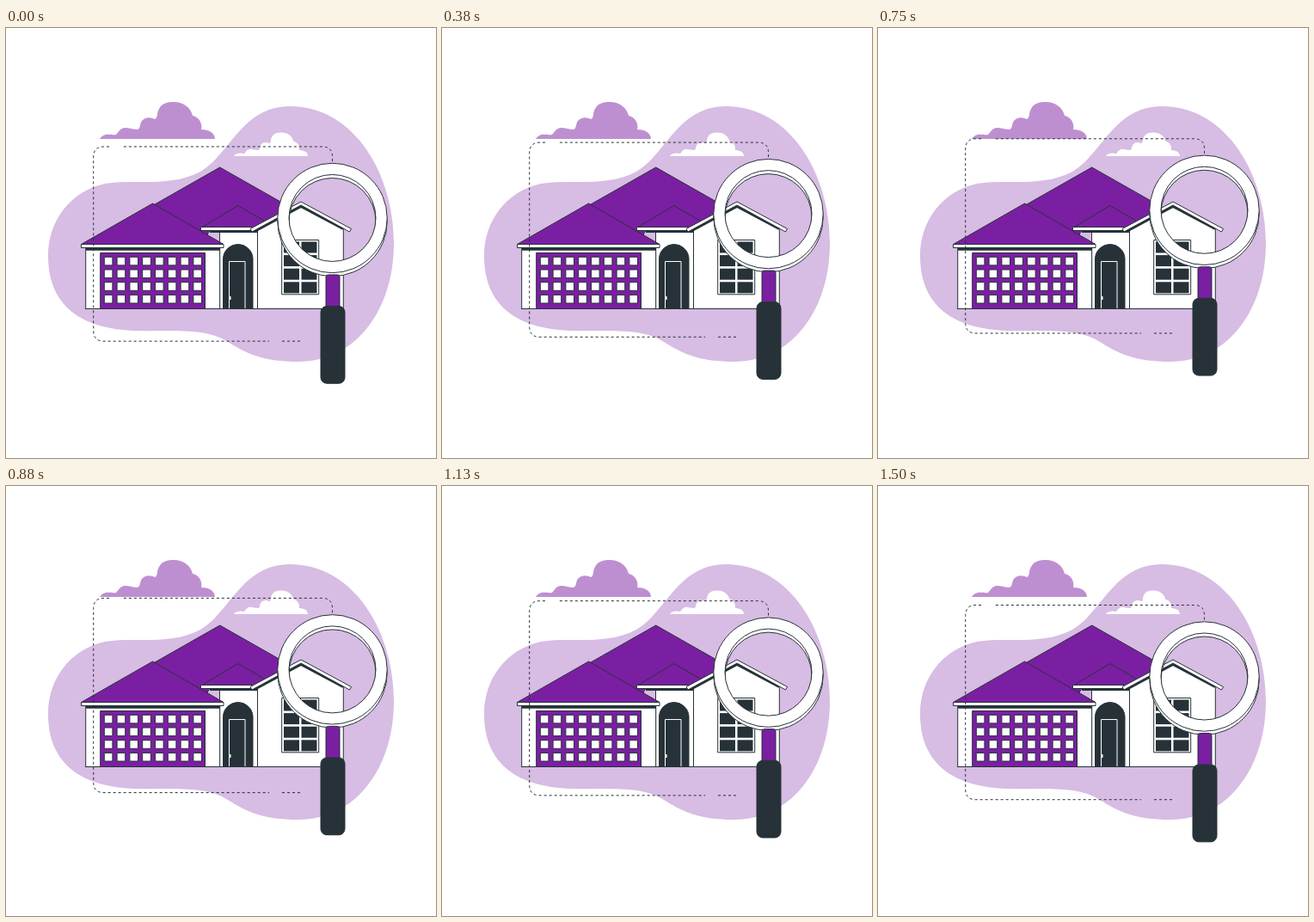
An HTML page with a canvas for the animation above (1.54 s loop, 500 by 500 pixels).

```html
<!DOCTYPE html>
<html lang="en">
<head>
<meta charset="utf-8">
<title>House search</title>
<style>
html, body { margin: 0; width: 100%; height: 100%; overflow: hidden; background: #fff; }
canvas { display: block; width: 100vmin; height: 100vmin; }
</style>
</head>
<body>
<canvas id="stage" width="500" height="500"></canvas>
<script>
const ctx = document.getElementById('stage').getContext('2d');
const INK = '#263238', PURPLE = '#7b1fa2', PALE = '#d7bce3', MID = '#bd8fd0', WHITE = '#fff';
const LOOP = 1540, STEPS = 37, RISE = 10, REST = 0.5;

const blob = new Path2D(`M49 265C49 225 74 190 115 181C150 175 190 186 226 167
  C260 148 274 91 330 91C405 91 451 170 451 250C451 330 405 388 340 388
  C300 388 280 379 258 365C232 348 190 353 150 352C90 350 49 325 49 265Z`);

// Origin at the lower left corner of the cloud
const cloud = new Path2D(`M0 0C2-3 6-6 11-5C13-6 16-4 19-5C22-8 23-12 29-13C34-13 39-11 44-11
  C48-12 46-19 50-22C54-26 60-25 64-23C68-24 66-31 69-35C72-42 80-43 86-43
  C98-43 106-36 108-27C115-26 120-18 118-11C125-11 134-8 134 0Z`);

const dashes = new Path2D(`M379.5 155V150Q379.5 138 367.5 138H134
  M120 138H114Q101.7 138 101.7 150V352Q101.7 364.2 114 364.2H306M321 364.2H344`);

function paint(path, fill, stroke = INK, width = 1) {
  if (fill) { ctx.fillStyle = fill; ctx.fill(path, 'evenodd'); }
  if (stroke) { ctx.strokeStyle = stroke; ctx.lineWidth = width; ctx.stroke(path); }
}

function shape(d, fill, stroke, width) {
  paint(new Path2D(d), fill, stroke, width);
}

function box(x, y, w, h, fill, stroke, radius = 0) {
  const path = new Path2D();
  path.roundRect(x, y, w, h, radius);
  paint(path, fill, stroke);
}

function drawCloud(x, y, scale, color) {
  ctx.save();
  ctx.translate(x, y);
  ctx.scale(scale, scale);
  paint(cloud, color, null);
  ctx.restore();
}

function grid(cols, rows, x, y, dx, dy, w, h, fill, stroke) {
  for (let r = 0; r < rows; r++)
    for (let c = 0; c < cols; c++) box(x + c * dx, y + r * dy, w, h, fill, stroke);
}

function drawHouse() {
  // Main roof and entrance
  shape('M166 209L248.7 162L335 211L300 236H236L230 251H166Z', PURPLE);
  shape('M248.5 236H292.5V326.5H248.5Z', WHITE);
  shape('M228 231.5L269.7 206.5L313 231.5Z', PURPLE);
  box(237, 234.5, 55, 3.5, INK, null);
  box(226.5, 231.5, 64, 4, WHITE);

  // Right wing
  shape('M292.5 326.5V233L343 205L392.3 231V326.5Z', WHITE);
  shape('M289 236.5L343 207.5L392 233.5', null, INK, 3);
  shape('M284 233.5L343 202L401.5 233.5L399.5 237L343 206L286 237Z', WHITE);
  box(320.7, 246.5, 43, 63.3, WHITE);
  grid(2, 4, 323, 248.5, 20.5, 15.6, 18, 13, INK, null);

  // Door
  shape('M252.5 326.5V267.5A17.3 17.3 0 0 1 287 267.5V326.5Z', INK);
  shape('M259.5 326V271.5H278V326', null, WHITE);
  box(260, 312, 1.5, 4, WHITE, null);

  // Garage
  shape('M92.7 253H248.7V326.5H92.7Z', WHITE);
  box(93, 254.5, 156, 4.3, INK, null);
  shape('M87.5 251.5L170.5 204L253 251.5Z', PURPLE);
  box(87.5, 251.5, 165.5, 4, WHITE);
  box(109.7, 261.5, 121.8, 65, PURPLE);
  grid(8, 4, 114.3, 266.3, 14.8, 14.7, 9.6, 9.6, WHITE, INK);
  shape('M92 326.5H392.8');
}

function ring(y) {
  const path = new Path2D();
  path.arc(379.5, y, 63.7, 0, Math.PI * 2);
  path.moveTo(429.5, y);
  path.arc(379.5, y, 50.5, 0, Math.PI * 2);
  paint(path, WHITE);
}

function drawSearch() {
  ctx.setLineDash([3, 3]);
  paint(dashes, null);
  ctx.setLineDash([]);
  ring(225);
  ring(221);
  box(372, 287, 16, 40, PURPLE, INK, 2.5);
  box(366, 323.5, 28, 89.8, INK, INK, 7);
}

// Height falls and rises linearly, lowest in the last step
function offset(time) {
  const step = Math.min(STEPS - 1, Math.floor((time % LOOP + 10) * STEPS / LOOP));
  const phase = (step + 1) % STEPS / STEPS;
  return REST - RISE * (1 - Math.abs(2 * phase - 1));
}

function draw(time) {
  ctx.fillStyle = WHITE;
  ctx.fillRect(0, 0, 500, 500);
  paint(blob, PALE, null);
  drawCloud(109, 129, 1, MID);
  drawCloud(265, 149, 0.642, WHITE);
  drawHouse();
  ctx.save();
  ctx.translate(0, offset(time));
  drawSearch();
  ctx.restore();
}

const start = performance.now();
function tick() {
  draw(performance.now() - start);
  requestAnimationFrame(tick);
}
tick();
</script>
</body>
</html>
```
